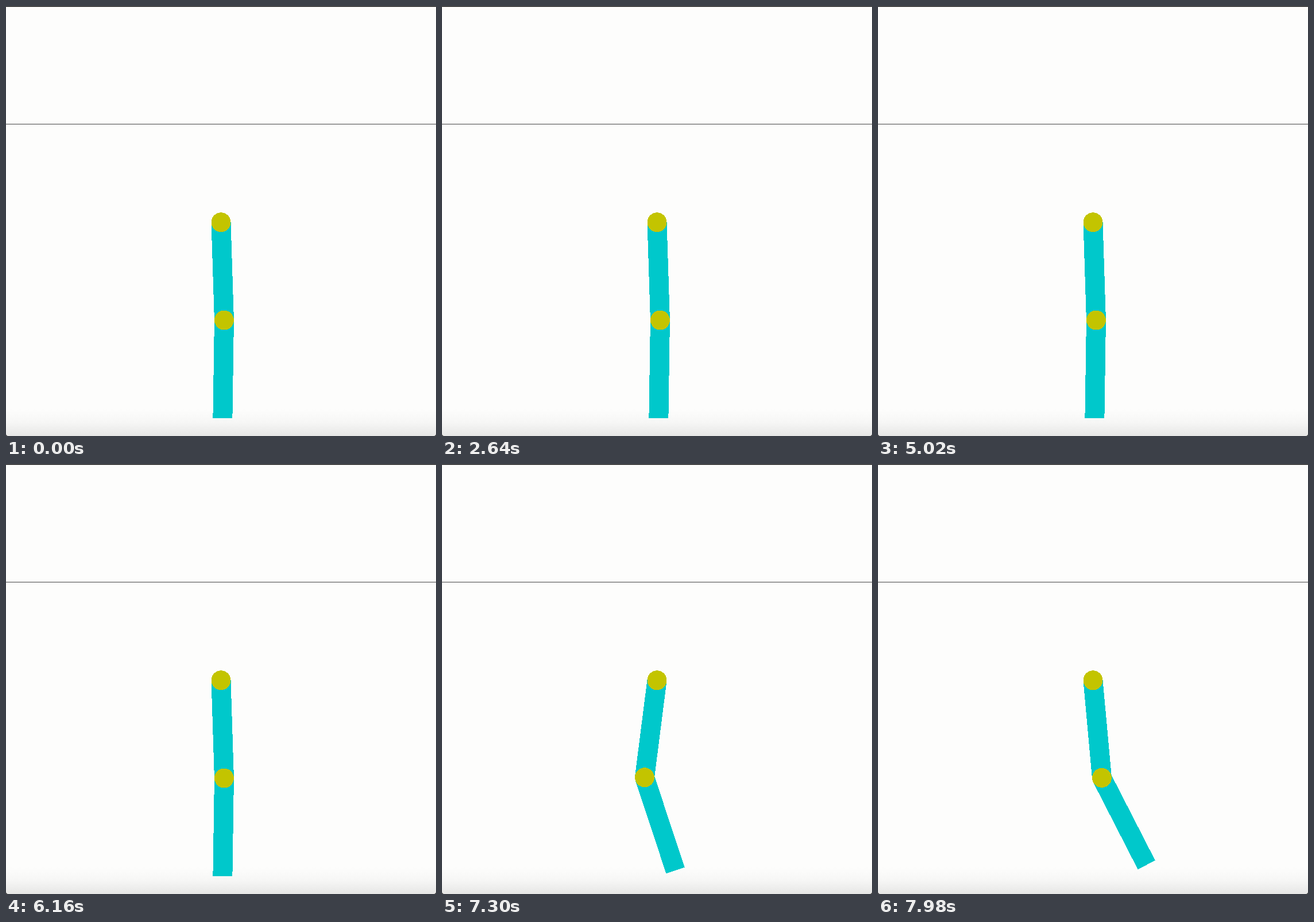
An HTML page for the animation above (8 s loop, 749 by 748 pixels).

```html
<!DOCTYPE html>
<html lang="en">
<head>
<meta charset="utf-8">
<title>Two-link pendulum</title>
<style>
html, body { margin: 0; width: 100%; height: 100%; overflow: hidden; background: #fdfdfc; }
svg { display: block; width: 749px; height: 748px; }
#upper { shape-rendering: crispEdges; }
.link { fill: #00c8cb; }
.joint { fill: #c3c400; }
</style>
</head>
<body>
<svg viewBox="0 0 749 748">
  <defs>
    <linearGradient id="shade" x1="0" y1="0" x2="0" y2="1">
      <stop offset="0" stop-color="#fdfdfc"/>
      <stop offset=".5" stop-color="#f6f6f5"/>
      <stop offset="1" stop-color="#e6e6e5"/>
    </linearGradient>
  </defs>
  <rect width="749" height="748" fill="#fdfdfc"/>
  <rect y="702" width="749" height="46" fill="url(#shade)"/>
  <rect width="749" height="1.3" fill="#000"/>
  <rect y="205" width="749" height="1" fill="#444"/>
  <path d="M0 744Q0 748 4 748H0ZM749 744Q749 748 745 748H749Z" fill="#222"/>
  <g id="upper">
    <rect class="link" x="-17" width="34" height="170.3"/>
    <circle class="joint" r="17"/>
    <g id="lower">
      <rect class="link" x="-17" width="34" height="170.3"/>
      <circle class="joint" r="17"/>
    </g>
  </g>
</svg>
<script>
const LOOP = 8000;
// Turning points of the swing: time in ms, then both joint angles in radians.
const POSES = [
  { time: 6920, shoulder: .032, elbow: -.047 },
  { time: 6980, shoulder: -.009, elbow: .024 },
  { time: 7190, shoulder: -.201, elbow: .52 },
  { time: 7300, shoulder: -.127, elbow: .447 },
  { time: 7510, shoulder: .115, elbow: 0 },
  { time: 7720, shoulder: -.305, elbow: .5 },
  { time: 7840, shoulder: -.2, elbow: .59 },
  { time: 7980, shoulder: .091, elbow: .383 }
];
const upper = document.getElementById('upper');
const lower = document.getElementById('lower');
const degrees = angle => -angle * 180 / Math.PI;
const poseAt = index => POSES[Math.max(0, Math.min(POSES.length - 1, index))];

// The picture holds for 20, 100 and 20 ms in turn.
function heldTime(time) {
  const rest = time % 140;
  return time - rest + (rest < 20 ? 0 : rest < 120 ? 20 : 120);
}

function slope(index, joint) {
  const before = poseAt(index - 1), after = poseAt(index + 1);
  return (after[joint] - before[joint]) / (after.time - before.time);
}

// Smooth cubic curve through the poses.
function angleAt(time, joint) {
  if (time <= POSES[0].time) return POSES[0][joint];
  const next = POSES.findIndex(pose => pose.time >= time);
  const a = POSES[next - 1], b = POSES[next];
  const span = b.time - a.time, p = (time - a.time) / span, q = 1 - p;
  return q * q * (1 + 2 * p) * a[joint] + p * p * (1 + 2 * q) * b[joint]
    + p * q * span * (q * slope(next - 1, joint) - p * slope(next, joint));
}

function draw(now) {
  const time = heldTime(now % LOOP);
  upper.setAttribute('transform', `translate(374.5 376.3) rotate(${degrees(angleAt(time, 'shoulder'))})`);
  lower.setAttribute('transform', `translate(0 170.3) rotate(${degrees(angleAt(time, 'elbow'))})`);
}

const start = performance.now();
function tick() {
  draw(performance.now() - start);
  requestAnimationFrame(tick);
}
tick();
</script>
</body>
</html>
```
